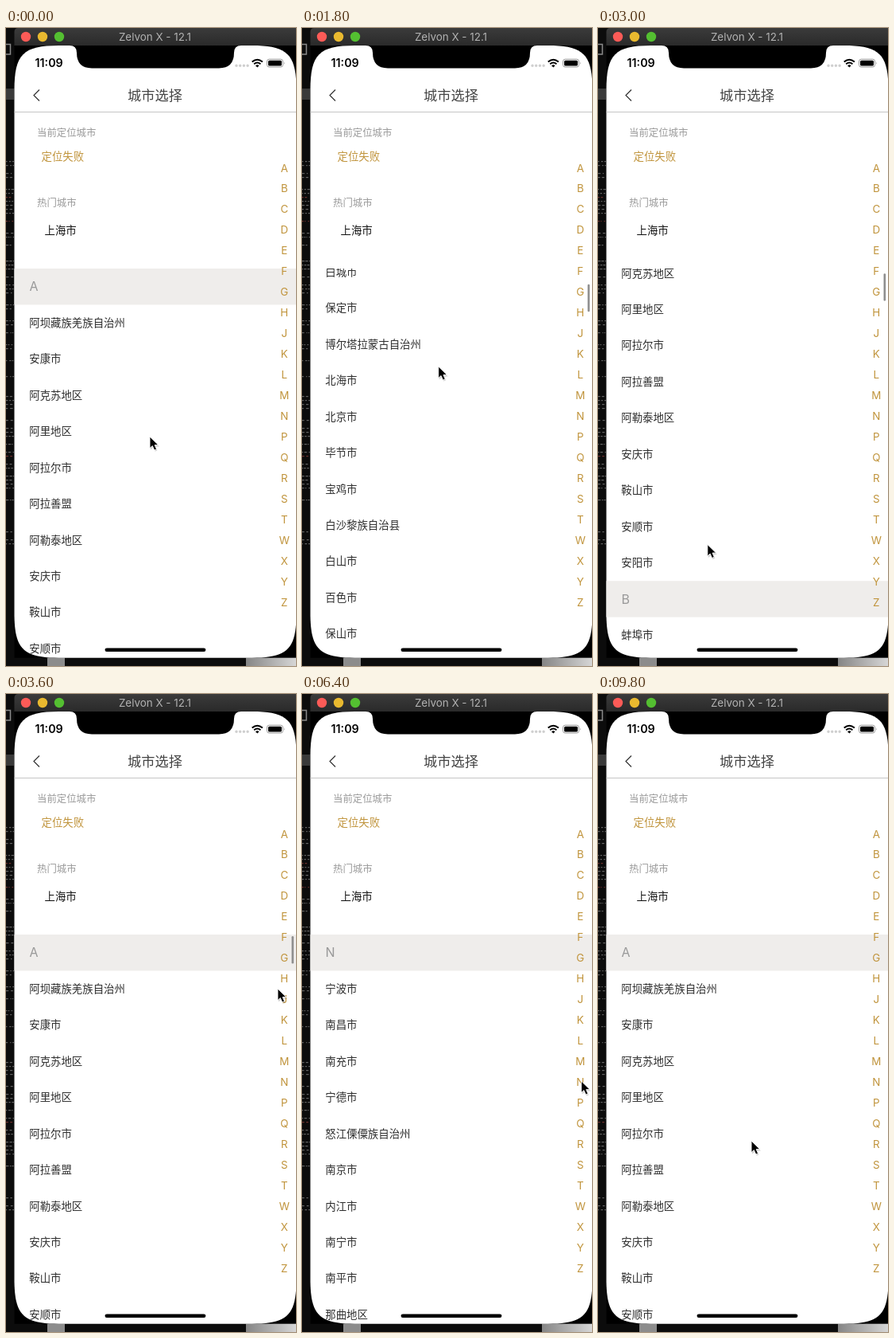
Write an HTML page that moves like this. It is 365x801 px and loops after 10000 ms.

```html
<!DOCTYPE html>
<html lang="zh-CN">
<head>
<meta charset="utf-8">
<title>城市选择</title>
<style>
  html, body { margin: 0; width: 100%; height: 100%; overflow: hidden; background: #0c0c0c; }
  svg { display: block; }
  text { font-family: "Noto Sans CJK SC", "Noto Sans CJK", sans-serif; font-size: 13.4px; fill: #2e2e2e; }
  .latin { font-family: Inter, Roboto, sans-serif; }
  .label { font-size: 12.4px; fill: #999; }
  .gold { fill: #c0943c; }
  .mid { text-anchor: middle; }
  .head { font-size: 16px; fill: #999; }
</style>
</head>
<body>
<svg width="365" height="801" viewBox="0 0 365 801">
  <defs>
    <clipPath id="screen">
      <path d="M10.5 78C10.5 33 21.5 22 66.5 22H309.5C354.5 22 365.5 33 365.5 78
               V734.7C365.5 779.7 354.5 790.7 309.5 790.7H66.5C21.5 790.7 10.5 779.7 10.5 734.7Z"/>
    </clipPath>
    <clipPath id="listBox"><rect x="10" y="302" width="356" height="490"/></clipPath>
    <linearGradient id="bar" x2="0" y2="1">
      <stop stop-color="#3b3b3b"/><stop offset="1" stop-color="#2a2a2a"/>
    </linearGradient>
    <linearGradient id="dock">
      <stop stop-color="#858585"/><stop offset="1" stop-color="#d6d6d6"/>
    </linearGradient>
  </defs>

  <rect width="365" height="801" fill="#0c0c0c"/>
  <g id="desk">
    <path d="M0 20.5H5.5V33H0" fill="none" stroke="#8a8a8a" stroke-width="1.5"/>
    <rect y="76" width="10" height="14" fill="#3a3a3a"/>
    <rect x="52" y="789" width="22" height="12" fill="#8c8c8c"/>
    <rect x="302" y="789" width="63" height="12" fill="url(#dock)"/>
  </g>
  <rect x="10.5" y="22" width="355" height="768.7" fill="#000"/>

  <path d="M10.5 22V5Q10.5 0 15.5 0H365V22Z" fill="url(#bar)"/>
  <circle cx="25" cy="11" r="6.2" fill="#fc5b57"/>
  <circle cx="46" cy="11" r="6.2" fill="#e9b92f"/>
  <circle cx="67" cy="11" r="6.2" fill="#54bf31"/>
  <text class="latin mid" x="187.5" y="16" style="font-size:13.4px;fill:#b2b2b2">Zelvon X - 12.1</text>

  <g clip-path="url(#screen)">
    <rect x="10" y="22" width="356" height="770" fill="#fff"/>
    <path d="M80 22Q89 22 89 31Q89 50.4 108 50.4H268Q287 50.4 287 31Q287 22 296 22Z" fill="#000"/>
    <text class="latin" x="36.5" y="49.2" style="font-size:14.3px;font-weight:600;fill:#000">11:09</text>
    <path d="M290 47.3H305" stroke="#cfcfcf" stroke-width="3.5" stroke-linecap="round" stroke-dasharray="0 4.7"/>
    <g fill="none" stroke="#000" stroke-width="2">
      <path d="M309.7 42.6Q316.3 36.8 322.9 42.6"/>
      <path d="M312.2 45.3Q316.3 41.8 320.4 45.3"/>
    </g>
    <path d="M314 47.2Q316.3 45.3 318.6 47.2L316.3 49.6Z" fill="#000"/>
    <rect x="328.5" y="39.2" width="20" height="9.8" rx="2.7" fill="none" stroke="#999"/>
    <rect x="330" y="40.7" width="17" height="6.8" rx="1.5" fill="#000"/>
    <path d="M350 42.4Q351.6 44 350 45.8Z" fill="#999"/>

    <path d="M42 77.5L35 84.5L42 91.5" fill="none" stroke="#333" stroke-width="1.2"/>
    <text class="mid" x="187.5" y="90.5" style="font-size:17.2px;font-weight:300;fill:#444">城市选择</text>
    <rect x="10" y="105" width="356" height="1" fill="#c6c6c6"/>
    <text class="label" x="39" y="135.7">当前定位城市</text>
    <text class="gold" x="44.5" y="166">定位失败</text>
    <text class="label" x="39" y="224.2">热门城市</text>
    <text x="48.5" y="259.2" style="fill:#111">上海市</text>

    <g clip-path="url(#listBox)"><g id="list"></g></g>
    <rect id="thumb" x="359.5" width="2.6" height="34.5" rx="1.3" fill="#8e8e8e"/>
    <g id="index"></g>
    <rect x="124.5" y="778.4" width="126.9" height="4.7" rx="2.35" fill="#000"/>
  </g>

  <g id="cursor">
    <path d="M1 2V16.5L4.3 13.6L6.6 18.6L9.4 17.4L7.2 12.5H12Z" fill="#000" opacity=".18"/>
    <path d="M0 0V14.6L3.3 11.6L5.7 17L8.5 15.8L6.2 10.6H10.8Z" fill="#000" stroke="#fff" stroke-width=".9"/>
  </g>
</svg>

<script>
const LOOP = 10000, STEP = 200, ROW = 45.45, TOP = 302, MOVE = 800;
const LETTERS = 'ABCDEFGHJKLMNPQRSTWXYZ';

const sections = {
  A: '阿坝藏族羌族自治州 安康市 阿克苏地区 阿里地区 阿拉尔市 阿拉善盟 阿勒泰地区 安庆市 鞍山市 安顺市 安阳市',
  B: '蚌埠市 白城市 保定市 博尔塔拉蒙古自治州 北海市 北京市 毕节市 宝鸡市 白沙黎族自治县 白山市 百色市 保山市 包头市 保亭黎族苗族自治县 白银市 滨州市 亳州市 巴中市 本溪市',
  J: '金昌市 晋城市 景德镇市 荆门市 金华市 吉林市 江门市 佳木斯市 济南市 济宁市 鸡西市 嘉兴市',
  L: '来宾市 临沧市 六安市 乐东黎族自治县 娄底市 廊坊市 临汾市 临高县 漯河市 丽江市 吕梁市 临沂市',
  N: '宁波市 南昌市 南充市 宁德市 怒江傈僳族自治州 南京市 内江市 南宁市 南平市 那曲地区 南通市 南阳市',
  R: '日喀则地区 日喀则市 日照市',
  S: '深圳市 韶关市 绥化市 上海市 石河子市 石家庄市 商洛市 三明市 三门峡市 遂宁市'
};

const $ = id => document.getElementById(id);
const letterY = c => 175.5 + LETTERS.indexOf(c) * 25.96;

// Progress from 0 to 1 between two times, eased at both ends
function ease(t, from, to) {
  const p = Math.min(1, Math.max(0, (t - from) / (to - from)));
  return p * p * (3 - 2 * p);
}

const taps = [
  { at: 4200, letter: 'J' }, { at: 5000, letter: 'L' }, { at: 5800, letter: 'N' },
  { at: 7200, letter: 'R' }, { at: 8390, letter: 'A' }
];
const stops = [
  { at: 0, x: 181, y: 513 },
  { at: 1200, x: 185, y: 374 },
  { at: 2400, x: 100, y: 700 },
  { at: 3600, x: 342, y: 370 },
  ...taps.map(({ at, letter }) => ({ at, x: 351.5, y: letterY(letter) - 1 })),
  { at: 9800, x: 193, y: 561 }
];

function add(parent, tag, attrs, text = '') {
  const el = document.createElementNS('http://www.w3.org/2000/svg', tag);
  for (const k in attrs) el.setAttribute(k, attrs[k]);
  el.textContent = text;
  parent.append(el);
}

const offsets = {};
let row = 0;
for (const [letter, cities] of Object.entries(sections)) {
  const y = TOP + row * ROW;
  offsets[letter] = row++ * ROW;
  add($('list'), 'rect', { x: 10, y, width: 356, height: ROW, fill: '#efedeb' });
  add($('list'), 'text', { x: 29.5, y: y + 28.4, class: 'latin head' }, letter);
  for (const city of cities.split(' ')) {
    add($('list'), 'text', { x: 29.3, y: TOP + row++ * ROW + 27.4 }, city);
  }
}

for (const c of LETTERS) {
  add($('index'), 'text', { x: 350.3, y: letterY(c) + 5, class: 'latin gold mid' }, c);
}

// Terminal lines behind the window
let seed = 7;
const rnd = () => (seed = seed * 16807 % 2147483647) / 2147483647;
for (let y = 162; y < 680; y += 5) {
  if (rnd() < .5) continue;
  const fill = rnd() < .1 ? '#6b2f2c' : '#626262';
  for (let x = 0; x < 9; x += 1 + rnd() * 2) {
    const width = Math.min(1 + rnd() * 2.5, 10 - x);
    add($('desk'), 'rect', { x, y, width, height: 1.2, fill });
    x += width;
  }
}

// Two flicks down the list, one back to the top, then jumps by letter
function scrollAt(t) {
  const tap = taps.filter(p => p.at <= t).pop();
  if (tap) return offsets[tap.letter];
  return 7 * ROW * ease(t, 200, 1200) + 10 * ROW * ease(t, 1400, 2000)
    - 17 * ROW * ease(t, 2000, 3400);
}

function cursorAt(t) {
  let { x, y } = stops[0];
  stops.slice(1).forEach((stop, i) => {
    const p = ease(t, Math.max(stops[i].at, stop.at - MOVE), stop.at);
    x += (stop.x - x) * p;
    y += (stop.y - y) * p;
  });
  return `${x} ${y}`;
}

function draw(ms) {
  const t = Math.floor(ms % LOOP / STEP) * STEP;
  const scroll = scrollAt(t);
  $('list').setAttribute('transform', `translate(0 ${-scroll})`);
  $('cursor').setAttribute('transform', `translate(${cursorAt(t)})`);
  $('thumb').setAttribute('y', 304 + scroll * .027);
  $('thumb').setAttribute('opacity', ease(t, 200, 400) - ease(t, 3600, 4000));
}

const start = performance.now();
function tick() {
  draw(performance.now() - start);
  requestAnimationFrame(tick);
}
tick();
</script>
</body>
</html>
```
